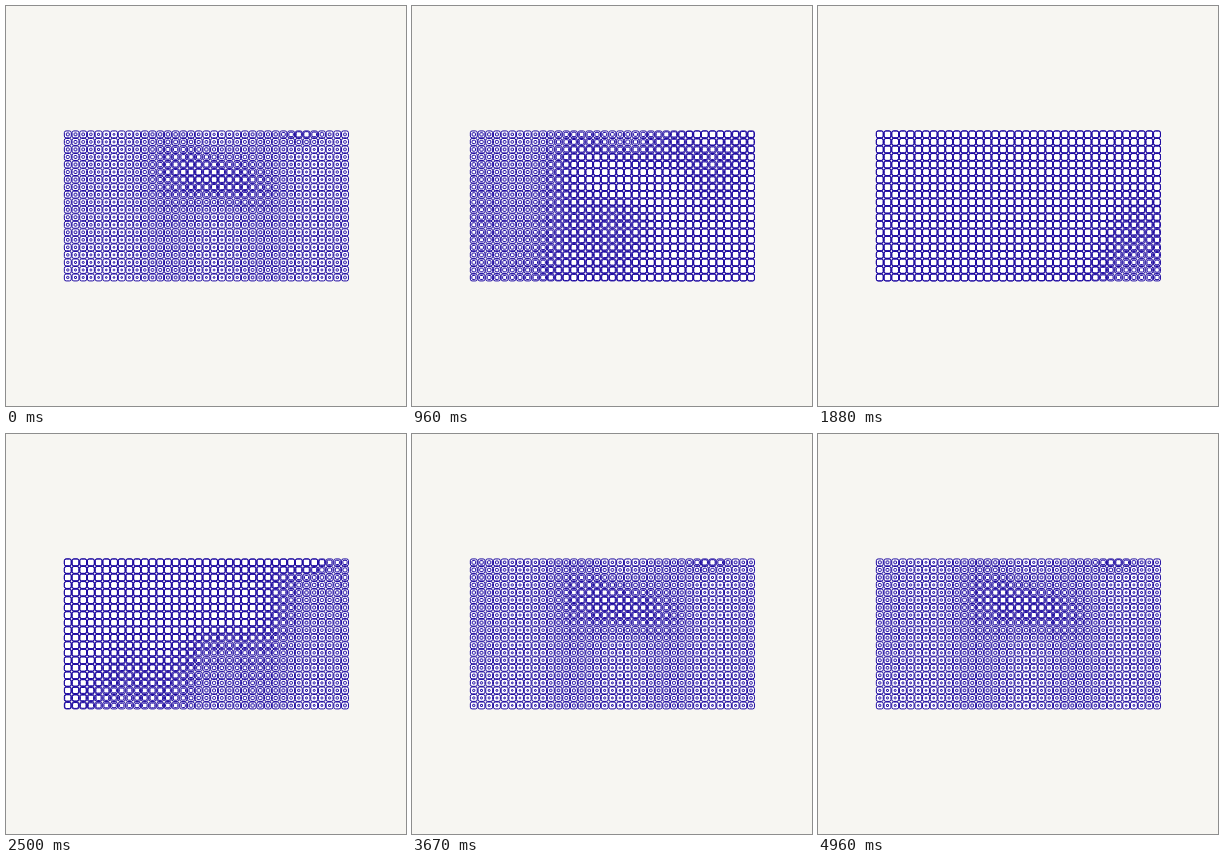
These frames come from a looping animation (400 px wide and 400 px high, 5000 ms). An HTML page with a canvas:

```html
<!DOCTYPE html>
<html lang="en">
<head>
<meta charset="utf-8">
<title>Pulse grid</title>
<style>
  html, body { margin: 0; width: 100%; height: 100%; overflow: hidden; background: #f7f6f2; }
  canvas { display: block; width: 400px; height: 400px; }
</style>
</head>
<body>
<canvas id="stage"></canvas>
<script>
const LOOP = 5000, COLS = 37, ROWS = 20;
const LEFT = 61.8, TOP = 128.4, STEP_X = 7.7, STEP_Y = 7.53;
const OUTER = 6.9, TINY = 0.6;

const canvas = document.getElementById('stage');
const ratio = window.devicePixelRatio || 1;
canvas.width = canvas.height = 400 * ratio;
const ctx = canvas.getContext('2d');
ctx.scale(ratio, ratio);

const clamp = v => Math.max(0, Math.min(1, v));
const blob = (dx, dy, rx, ry) => Math.exp(-((dx / rx) ** 2) - (dy / ry) ** 2);

// Resting pattern: faint vertical bands, a slanted dome and a spot at the top right
function restSize(x, y) {
  const bands = -0.1 * Math.cos((x - 112) * 2 * Math.PI / 98);
  const dy = y - 172;
  const dome = 0.5 * blob(x - 212 - 0.7 * dy, dy, 42, 25);
  const halo = 0.17 * blob(x - 185, dy, 55, 45);
  const spot = 0.6 * blob(x - 299, y - 126, 20, 11);
  const corner = -0.14 * blob(x - 68, y - 262, 28, 28);
  return clamp(0.27 + bands + dome + halo + spot + corner);
}

const cells = [];
for (let r = 0; r < ROWS; r++) {
  for (let c = 0; c < COLS; c++) {
    const x = LEFT + c * STEP_X, y = TOP + r * STEP_Y;
    const lag = 0.62 * (1 - c / (COLS - 1)) + 0.38 * (1 - r / (ROWS - 1));
    cells.push({ x, y, lag, rest: restSize(x, y) });
  }
}

const bell = (x, span, power) =>
  Math.abs(x) >= span ? 0 : ((1 + Math.cos(Math.PI * x / span)) / 2) ** power;

// A swell crossing from the bottom right, slower to settle than to rise
function pulse(t, lag) {
  const peak = 1000 + 1550 * lag;
  const rise = 1100 + 900 * lag;
  const x = (t - peak + rise + LOOP) % LOOP - rise;
  return x < 0 ? bell(x, rise, 1.2) : bell(x, 2500, 4);
}

function box(x, y, size) {
  ctx.beginPath();
  ctx.roundRect(x - size / 2, y - size / 2, size, size, size * 0.26);
}

function draw(t) {
  ctx.fillStyle = '#f7f6f2';
  ctx.fillRect(0, 0, 400, 400);
  ctx.fillStyle = '#fff';
  ctx.strokeStyle = '#1c08a0';
  ctx.lineWidth = 1;
  for (const { x, y, lag, rest } of cells) {
    box(x, y, OUTER);
    ctx.fill();
    ctx.stroke();
    box(x, y, TINY + (OUTER - TINY) * clamp(rest + pulse(t, lag)));
    ctx.stroke();
  }
}

const start = performance.now();
function tick() {
  draw((performance.now() - start) % LOOP);
  requestAnimationFrame(tick);
}
tick();
</script>
</body>
</html>
```
